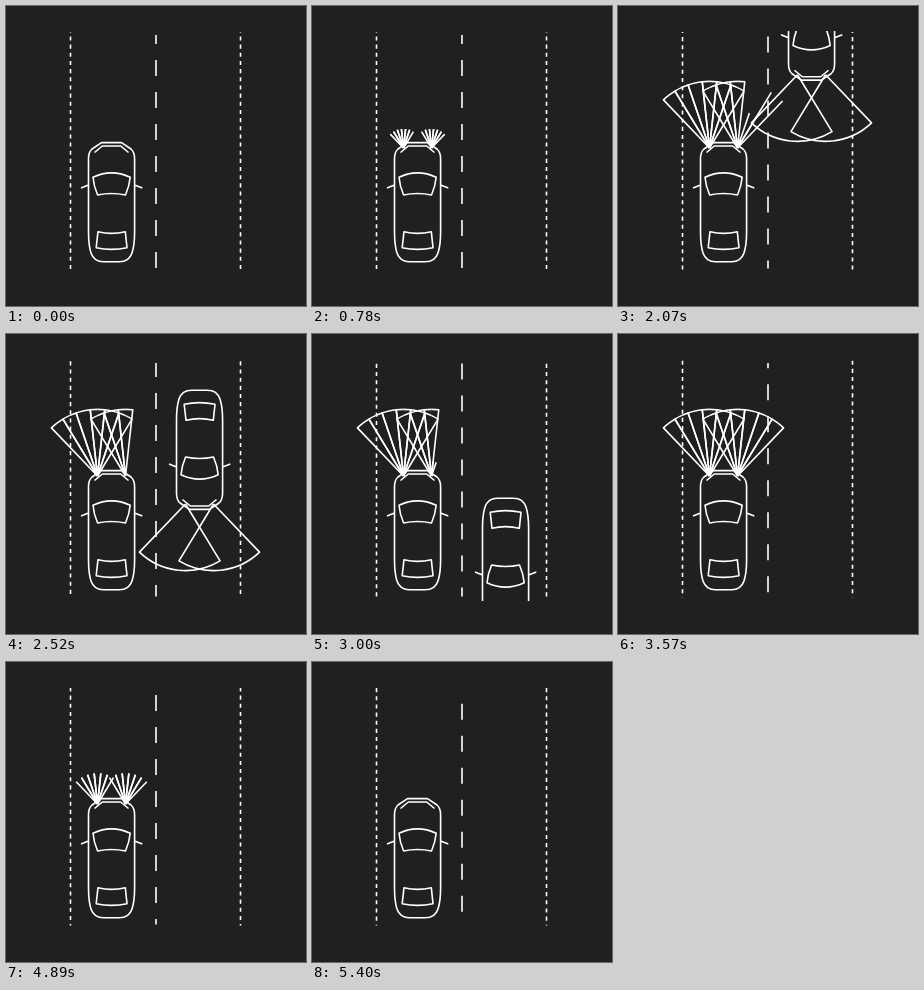
Write an HTML page with a canvas that moves like this. It is 300 by 300 pixels and loops after 5430 ms.

```html
<!DOCTYPE html>
<html>
<head>
<meta charset="utf-8">
<style>
  html, body { margin: 0; width: 100%; height: 100%; overflow: hidden; background: #21201e; }
  canvas { display: block; width: 300px; height: 300px; }
</style>
</head>
<body>
<canvas></canvas>
<script>
const LOOP = 5430, STEP = 30;
const RADIUS = 66.6, SECTOR = 12.5, LAMP_Y = 142;
const LEFT_LAMP = 91.5, RIGHT_LAMP = 119.5;
const OUTER = 43.75, INNER = 31.25;
const canvas = document.querySelector('canvas');
const scale = window.devicePixelRatio || 1;
canvas.width = canvas.height = 300 * scale;
const ctx = canvas.getContext('2d');

const car = new Path2D(`
  M82.5 153 Q82.5 146 86 143 L95.5 136.6 H115.5 L125 143 Q128.6 146 128.6 153
  V226 Q128.6 239 126 247 Q123 255.8 113.5 255.8 H97.5 Q88 255.8 85 247 Q82.5 239 82.5 226 Z
  M88.5 146.5 L96.3 140 H114.7 L122.5 146.5
  M87 171.3 Q105.5 162.5 124.2 171.3 Q123.4 180 119.5 189 Q105.5 186 91.6 189 Q87.7 180 87 171.3 Z
  M92 225.7 Q105.5 229 119.3 225.7 L121 241.7 Q105.5 245 90.2 241.7 Z
  M82.5 179 L75 182 M128.6 179 L136.3 182`);

// Eased progress from 0 to 1 between two times
function ease(t, from, to) {
  const p = Math.min(1, Math.max(0, (t - from) / (to - from)));
  return p * p * (3 - 2 * p);
}

// Sector outline grown from its apex along both edges; angles in degrees from straight ahead
function drawSector(x, from, to, grown) {
  if (grown <= 0) return;
  const a = (from - 90) * Math.PI / 180, b = (to - 90) * Math.PI / 180;
  const mid = (a + b) / 2;
  const half = RADIUS * (1 + (b - a) / 2);
  ctx.setLineDash(grown < 1 ? [grown * half, 999] : []);
  for (const edge of [a, b]) {
    ctx.beginPath();
    ctx.moveTo(x, LAMP_Y);
    ctx.arc(x, LAMP_Y, RADIUS, edge, mid, edge > mid);
    ctx.stroke();
  }
  ctx.setLineDash([]);
}

// Dashed line clipped to its ends, its dashes shifted down by a number of periods
function drawLane(x, top, bottom, dash, start, cycles) {
  ctx.setLineDash([dash, dash]);
  ctx.lineDashOffset = top - start - cycles % 1 * dash * 2;
  ctx.beginPath();
  ctx.moveTo(x, top);
  ctx.lineTo(x, bottom);
  ctx.stroke();
  ctx.setLineDash([]);
  ctx.lineDashOffset = 0;
}

function drawBeams(t) {
  const all = ease(t, 600, 1140) - ease(t, 4590, 5130);
  for (let i = 0; i < 6; i++) {
    const left = i * SECTOR - OUTER, right = i * SECTOR - INNER;
    const k = i - 3;
    // The outer right sectors dim for oncoming traffic
    const dim = k < 0 ? 0 : ease(t, 1740 + 120 * k, 2160 + 120 * k) - ease(t, 2880 + 90 * k, 3300 + 90 * k);
    drawSector(LEFT_LAMP, left, left + SECTOR, all);
    drawSector(RIGHT_LAMP, right, right + SECTOR, all * (1 - dim));
  }
}

function drawOncoming(t) {
  ctx.save();
  ctx.beginPath();
  ctx.rect(0, 25, 300, 242);
  ctx.clip();
  ctx.translate(88, 312 + (t - 2520) * 0.225);
  ctx.scale(1, -1);
  ctx.stroke(car);
  drawSector(LEFT_LAMP, -OUTER, INNER, 1);
  drawSector(RIGHT_LAMP, -INNER, OUTER, 1);
  ctx.restore();
}

function draw(now) {
  const t = Math.floor(now % LOOP / STEP) * STEP;
  ctx.setTransform(scale, 0, 0, scale, 0, 0);
  ctx.fillStyle = '#21201e';
  ctx.fillRect(0, 0, 300, 300);
  ctx.strokeStyle = '#fff';
  ctx.lineWidth = 1.6;
  ctx.lineJoin = 'round';
  drawLane(64.5, 26, 263.5, 4.08, 22.3, t / 39);
  drawLane(234.5, 26, 263.5, 4.08, 22.3, t / 39);
  drawLane(150, 29, 262.5, 16, 22, t / 156);
  ctx.stroke(car);
  drawBeams(t);
  drawOncoming(t);
}

const begin = performance.now();
function tick() {
  draw(performance.now() - begin);
  requestAnimationFrame(tick);
}
tick();
</script>
</body>
</html>
```
